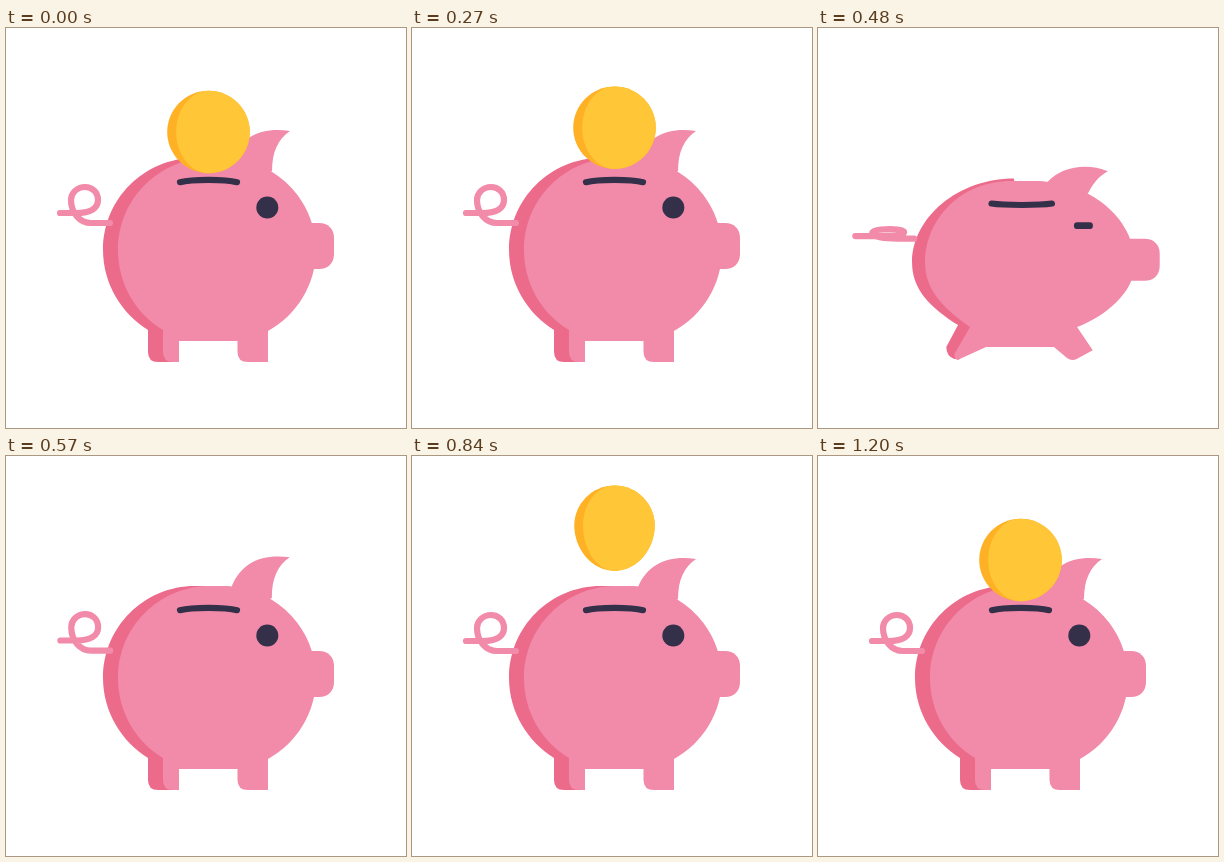
An HTML page that plays this animation: 400 px wide and 400 px high, repeating every 1260 ms.

```html
<!DOCTYPE html>
<html lang="en">
<head>
<meta charset="utf-8">
<title>Piggy bank</title>
<style>
  html, body { margin: 0; width: 100%; height: 100%; overflow: hidden; background: #fff; }
  svg { display: block; width: 100vw; height: 100vh; }
  .pink { fill: #f28aaa; }
  .rose { fill: #ec6b8b; }
  .ink { fill: #35304a; }
  .line { fill: none; stroke-width: 6.2; stroke-linecap: round; stroke-linejoin: round; }
</style>
</head>
<body>
<svg viewBox="0 0 400 400">
  <clipPath id="above"><rect id="cut" width="400"/></clipPath>
  <path id="back" class="rose"/>
  <path id="ear" class="pink"/>
  <path id="body" class="pink"/>
  <path id="snout" class="pink"/>
  <path id="tail" class="line" stroke="#f28aaa"/>
  <rect id="eye" class="ink"/>
  <g clip-path="url(#above)">
    <path id="rim" fill="#ffb125"/>
    <path id="face" fill="#ffc738"/>
  </g>
  <path id="slot" class="line" stroke="#35304a"/>
</svg>
<script>
const LOOP = 1260, STEP = 30;
const el = id => document.getElementById(id);
const lerp = (a, b, k) => a + (b - a) * k;

const linear = k => k;
const smooth = k => k * k * (3 - 2 * k);
const easeIn = k => k * k;
const easeOut = k => k * (2 - k);

// Keys are [time, value, easing towards this key].
function track(keys, t) {
  if (t <= keys[0][0]) return keys[0][1];
  for (let i = 1; i < keys.length; i++) {
    const [t0, v0] = keys[i - 1], [t1, v1, ease = smooth] = keys[i];
    if (t < t1) return lerp(v0, v1, ease((t - t0) / (t1 - t0)));
  }
  return keys[keys.length - 1][1];
}

// Each part: upright pose, squashed pose.
const poses = {
  back: [
    "M210 130 L189 130 C138 130 97 171 97 222 C97 256 116 286 142 302 L142 324 Q142 334 152 334 L173 334 L173 300 Z",
    "M196 153 L196 151 C140 151 94 190 94 235 C94 262 113 280 140 297 L128 319 Q128 328 136 331 L141 331 L168 300 Z"
  ],
  body: [
    "M204 130 L217 130 C268 130 310 171 310 222 C310 256 291 287 262 303 L262 334 L242 334 Q231.5 334 231.5 324 L231.5 313 L173 313 L173 334 L167 334 Q157 334 157 324 L157 302 C130 286 112 256 112 222 C112 171 153 130 204 130 Z",
    "M193 153.5 L217 153.5 C271 153.5 317 190 317 236 C317 264 288 288 259 299 L275 322 L259 331 Q253 334 247 328 L236 319 L168 319 L141 331 L140 332 Q136 332 136 326 L152 299 C125 280 107 262 107 235 C107 191 143 153.5 193 153.5 Z"
  ],
  snout: [
    "M296 195 L313 195 C322 195 328 201 328 210 L328 226 C328 235 322 241 313 241 L296 241 Z",
    "M300 211 L327 211 C336 211 342 217 342 226 L342 238 C342 247 336 253 327 253 L300 253 Z"
  ],
  ear: [
    "M226 131 C236 108 256 99 284 103 C272 111 266 124 266 143 L240 155 Z",
    "M230 154 C243 140 268 135 290 144 C281 149 275 156 270 166 L240 175 Z"
  ],
  slot: [
    "M174 154.2 C186 151 219 151 231 154.2",
    "M173.5 176 C186 178 222 178 234 176"
  ],
  tail: [
    "M54 185 L70 185 C85 185 92 180 92 172 C92 164 86 159 79 159 C71 159 65 165 65 172 C65 185 74 195 85 195 L104 195",
    "M37 208.5 L64 208.5 C78 208.5 86 208 86 205 C86 203 79 202 72 202 C62 202 54 203 54 206 C54 210 68 210.5 80 211 L96 211"
  ]
};

function mix([a, b], k) {
  const nums = b.match(/[\d.]+/g);
  let i = 0;
  return a.replace(/[\d.]+/g, n => lerp(+n, +nums[i++], k).toFixed(2));
}

const squash = [[282, 0], [440, 1.42], [548, 0]];
const sway = [[548, 0], [610, -.15], [690, .09], [740, 0]];
const swayShare = { ear: 1, tail: .5 };
const coinY = [
  [0, 104], [130, 68, easeOut], [285, 107, easeIn], [360, 112, linear], [445, 226, easeIn],
  [780, 226], [865, 56, easeOut], [955, 109], [1080, 96], [1200, 104]
];
const coinPinch = [[270, 0], [360, 1], [780, 1], [865, 0]];

function coinPath(left, right, y, m) {
  const cx = 202.5, top = y - 41.2, mid = top + lerp(41.2, 36, m), bot = top + lerp(82.4, 97, m);
  const c1 = mid - (mid - top) * .55, c2 = mid + lerp(22.6, 20, m);
  const width = lerp(1, .88, m), low = lerp(.55, .76, m);
  const l = left * width, r = right * width;
  return `M${cx} ${top} C${cx + r * .55} ${top} ${cx + r} ${c1} ${cx + r} ${mid}` +
    `C${cx + r} ${c2} ${cx + r * low} ${bot} ${cx} ${bot}` +
    `C${cx - l * low} ${bot} ${cx - l} ${c2} ${cx - l} ${mid}` +
    `C${cx - l} ${c1} ${cx - l * .55} ${top} ${cx} ${top}Z`;
}

function setAttrs(id, attrs) {
  for (const name in attrs) el(id).setAttribute(name, attrs[name]);
}

function draw(t) {
  const p = track(squash, t), s = track(sway, t);
  for (const id in poses) setAttrs(id, { d: mix(poses[id], p + s * (swayShare[id] || 0)) });

  const hw = lerp(11, 9.5, p), hh = Math.max(1.5, lerp(11, 3.2, p));
  setAttrs("eye", {
    x: lerp(261.3, 265.5, p) - hw, y: lerp(179.5, 198, p) - hh,
    width: 2 * hw, height: 2 * hh, rx: Math.min(hw, hh)
  });

  const y = track(coinY, t), m = track(coinPinch, t);
  setAttrs("cut", { height: lerp(152, 177, p) });
  setAttrs("rim", { d: coinPath(41.3, 41.3, y, m) });
  setAttrs("face", { d: coinPath(32.3, 41.3, y, m) });
}

function tick(now) {
  draw(Math.floor((now % LOOP) / STEP) * STEP);
  requestAnimationFrame(tick);
}
draw(0);
requestAnimationFrame(tick);
</script>
</body>
</html>
```
